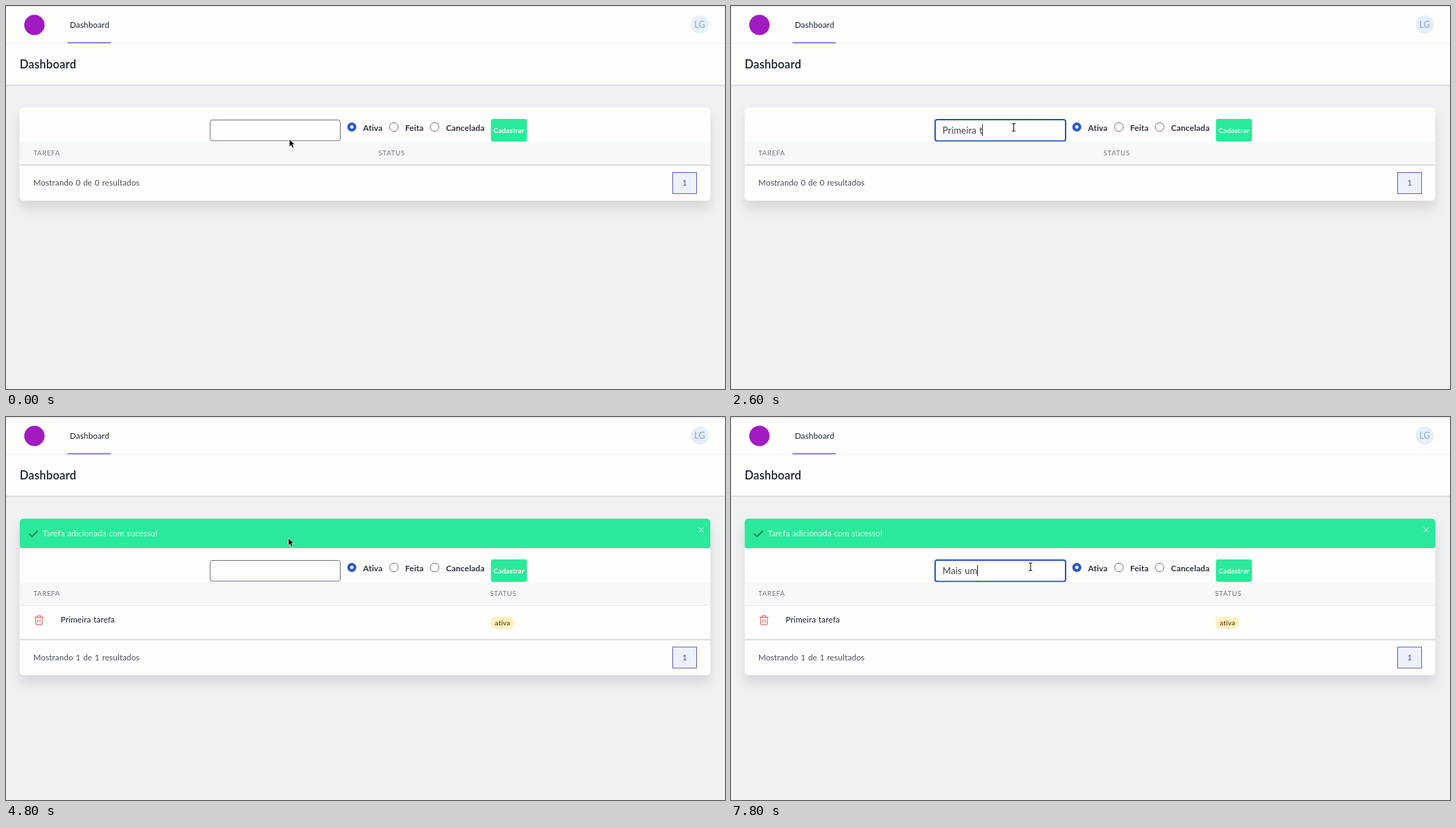
These frames come from a looping animation (1025x546 px, 8000 ms). An HTML page:

```html
<!DOCTYPE html>
<html lang="pt">
<head>
<meta charset="utf-8">
<title>Dashboard</title>
<style>
html, body { margin: 0; width: 100%; height: 100%; overflow: hidden; background: #f0f1f3; }
svg { display: block; width: 1025px; height: 546px; }
text { font-family: Lato, "Open Sans", sans-serif; font-size: 11.6px; fill: #454c58; letter-spacing: .01em; word-spacing: .05em; white-space: pre; }
.ink { fill: #16202d; }
.b { font-weight: 700; }
.label { font-size: 11.8px; fill: #2b3340; }
.head { font-size: 9.7px; fill: #6f757e; letter-spacing: .06em; }
.white { fill: #fffefd; }
.mid { text-anchor: middle; }
.card { filter: drop-shadow(0 11px 8px rgba(30, 35, 45, .13)); }
.line { fill: none; stroke-width: 1; }
</style>
</head>
<body>
<svg viewBox="0 0 1025 546">
  <defs>
    <linearGradient id="fade" x2="0" y2="1">
      <stop stop-color="#d6d8da"/><stop offset="1" stop-color="#f0f1f3"/>
    </linearGradient>
  </defs>
  <rect width="1025" height="546" fill="#f0f1f3"/>
  <rect class="white" width="1025" height="112"/>
  <rect width="1025" height="1" fill="#e1e2e4"/>
  <rect y="53" width="1025" height="1" fill="#efeff1"/>
  <rect y="112" width="1025" height="3" fill="url(#fade)"/>
  <circle cx="40.5" cy="27" r="14.5" fill="#a01bc0"/>
  <text class="ink" x="91" y="31">Dashboard</text>
  <rect x="87.5" y="51.5" width="62" height="1.7" fill="#7873d2"/>
  <circle cx="989" cy="26.5" r="13" fill="#e5f0fb"/>
  <text class="mid" x="989" y="31" style="font-size:12.5px;fill:#84a5d8">LG</text>
  <text class="ink" x="19.5" y="88.5" style="font-size:16.5px;font-weight:600">Dashboard</text>

  <rect id="card" class="card white" x="19.5" y="145" width="984.5" height="132.5" rx="5"/>

  <g id="form">
    <rect id="box" class="line" fill="none"/>
    <text id="typed" x="301.5" y="181.7" style="font-size:13px;fill:#3b424d"></text>
    <rect id="caret" y="169" width="1" height="16" fill="#222"/>
    <circle cx="493" cy="172.5" r="6.5" fill="#2a58d2"/>
    <circle class="white" cx="493" cy="172.5" r="2.4"/>
    <g class="line" stroke="#6b7280">
      <circle cx="553" cy="172.5" r="6.2"/>
      <circle cx="611" cy="172.5" r="6.2"/>
    </g>
    <text class="b label" x="509" y="177.5">Ativa</text>
    <text class="b label" x="569" y="177.5">Feita</text>
    <text class="b label" x="627.3" y="177.5">Cancelada</text>
    <rect x="691.3" y="161" width="51.4" height="32" rx="3" fill="#2ae99a"/>
    <text class="b white mid" x="717" y="181" style="font-size:10px">Cadastrar</text>
    <rect x="19.5" y="193.5" width="984.5" height="33" fill="#f7f9f8"/>
    <text class="head" x="39" y="213">TAREFA</text>
    <text id="status" class="head" y="213">STATUS</text>
  </g>

  <g id="added">
    <path d="M19.5 187v-37a5 5 0 0 1 5-5h974.500a5 5 0 0 1 5 5v34a3 3 0 0 1-3 3h-978.500a3 3 0 0 1-3-3z" fill="#2ae99a"/>
    <path d="M33 166.300l4.200 4.200 8-8" fill="none" stroke="#0c8546" stroke-width="1.900"/>
    <text x="52" y="169.500" style="fill:#e4fff1">Tarefa adicionada com sucesso!</text>
    <path d="M987.500 157.500l7 7m0-7l-7 7" class="line" stroke="#effff7"/>
    <rect x="19.5" y="268" width="984.5" height="1" fill="#e7e9eb"/>
    <g class="line" stroke="#dc5454" stroke-width="1.200">
      <path d="M40.500 285.500h13M44.500 285.500v-2.500h5v2.500M42 285.500l.7 10.500h8.600l.7-10.500M45.500 288.500v4.500M48.500 288.500v4.500"/>
    </g>
    <text class="ink" x="78" y="293">Primeira tarefa</text>
    <rect x="690.5" y="285" width="34.500" height="17" rx="8.500" fill="#fdf1bd"/>
    <text class="mid" x="707.700" y="297" style="font-size:10px;font-weight:600;fill:#784220">ativa</text>
  </g>

  <g id="foot">
    <rect x="19.5" y="226" width="984.5" height="1.300" fill="#cdcfd2"/>
    <rect x="19.5" y="227.300" width="984.5" height="1" fill="#f0f0f1"/>
    <text id="count" x="39" y="256"></text>
    <rect x="950.5" y="237.500" width="34" height="30" class="line" style="fill:#edf1fb" stroke="#5d5eb6"/>
    <text class="mid" x="967.500" y="256.200" style="font-size:12px;fill:#554bbd">1</text>
  </g>

  <path id="arrow" d="M0 0v10.700l2.500-2.300 1.800 4 2-.9-1.800-3.900h3.300z" fill="#000" stroke="#fff" stroke-width=".7"/>
  <path id="beam" d="M-2.500-5.500q2 0 2.500 1 .5-1 2.500-1M0-4.500v9M-2.500 5.500q2 0 2.500-1 .5 1 2.500 1" fill="none" stroke="#111" stroke-width="1.100"/>
</svg>
<script>
const LOOP = 8000, SAVED = 4800;
const $ = id => document.getElementById(id);
const FIRST = "Primeira tarefa", SECOND = "Mais um";

// [time, x, y, pointer]
const pointer = [
  [0, 404, 190, "arrow"], [300, 404, 178, "beam"], [400, 403, 174, "beam"],
  [1100, 403, 173, "beam"], [4500, 402.5, 172.5, "arrow"],
  [5200, 400, 177, "arrow"], [5300, 399, 186, "arrow"], [5400, 404, 197, "arrow"],
  [5500, 414, 210, "beam"], [5600, 423, 213, "beam"], [5700, 427, 214.5, "beam"],
  [6200, 427, 213.5, "beam"]
];

// [time, number of characters]
const keys = [
  [0, 0], [1600, 1], [1700, 2], [1800, 3],
  ...Array.from({ length: 8 }, (_, i) => [2000 + i * 100, 4 + i]),
  [2900, 13], [3200, 14], [3300, 15], [SAVED, 0],
  [7200, 1], [7300, 2], [7400, 3], [7500, 5], [7600, 6], [7800, 7]
];

const focus = [[0, 0], [700, 1], [SAVED, 0], [6000, 1]];
const blink = [[0, 0], [700, 1], [1300, 0], [1600, 1], [4000, 0], [4500, 1],
  [SAVED, 0], [6000, 1], [6700, 0], [7200, 1]];

const at = (steps, t) => steps.findLast(s => s[0] <= t);
const show = (id, on) => $(id).setAttribute("visibility", on ? "visible" : "hidden");
const set = (id, attrs) => {
  for (const k in attrs) $(id).setAttribute(k, attrs[k]);
};

function draw(t) {
  const saved = t >= SAVED;
  set("form", { transform: `translate(0 ${saved ? 42 : 0})` });
  set("foot", { transform: `translate(0 ${saved ? 90.5 : 0})` });
  set("card", { height: saved ? 223 : 132.5 });
  set("status", { x: saved ? 690 : 531 });
  show("added", saved);
  const n = +saved;
  $("count").textContent = `Mostrando ${n} de ${n} resultados`;

  set("box", at(focus, t)[1]
    ? { x: 291, y: 162, width: 186, height: 30.5, rx: 3, stroke: "#2855c6", style: "stroke-width:2" }
    : { x: 291, y: 162.5, width: 185.5, height: 29.5, rx: 3, stroke: "#6b7280", style: "" });

  const typed = $("typed");
  typed.textContent = (saved ? SECOND : FIRST).slice(0, at(keys, t)[1]);
  const end = typed.textContent ? typed.getComputedTextLength() : 0;
  set("caret", { x: Math.round(301 + end) });
  show("caret", at(blink, t)[1]);

  const [, x, y, shape] = at(pointer, t);
  for (const id of ["arrow", "beam"]) {
    show(id, id === shape);
    set(id, { transform: `translate(${x} ${y})` });
  }
}

const start = performance.now();
function tick() {
  draw((performance.now() - start) % LOOP);
  requestAnimationFrame(tick);
}
draw(0);
requestAnimationFrame(tick);
</script>
</body>
</html>
```
